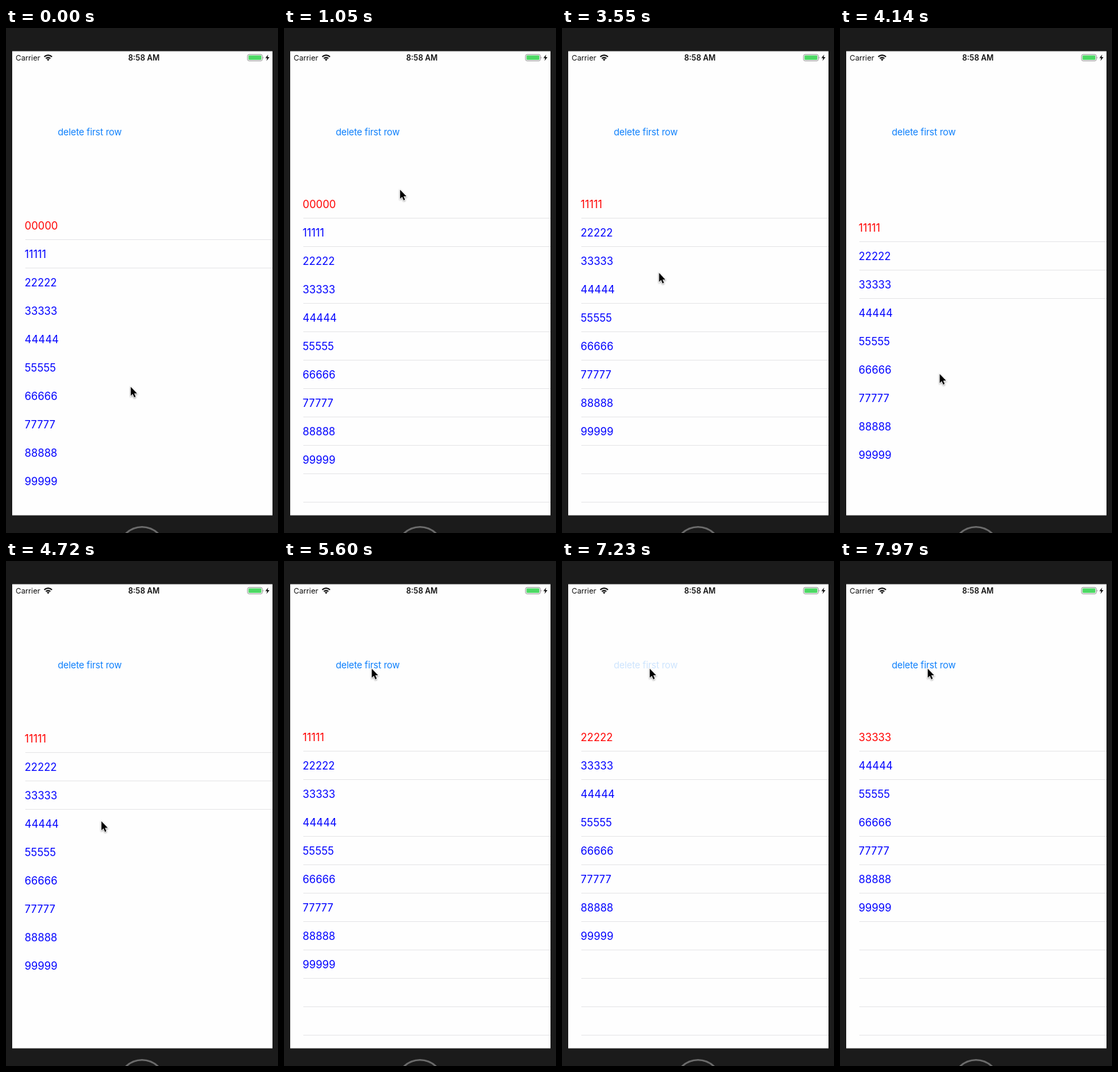
An HTML page for the animation above (8000 ms loop, 394 px wide and 729 px high).

```html
<!DOCTYPE html>
<html lang="en">
<head>
<meta charset="utf-8">
<title>Delete first row</title>
<style>
  html, body { margin: 0; width: 100%; height: 100%; overflow: hidden; background: #1b1b1b; }
  svg { display: block; width: 394px; height: 729px; font-family: Inter, Roboto, sans-serif; }
  .status { font-size: 10.9px; fill: #111; }
  .clock { font-size: 11.1px; font-weight: 600; text-anchor: middle; }
  #button { font-size: 13.4px; letter-spacing: -.15px; fill: #0f80fc; }
  #rows, #leaving { font-size: 15.3px; }
  #lines { fill: #e7e7e9; }
  #cursor { filter: drop-shadow(0 1px 1px rgba(0, 0, 0, .4)); }
</style>
</head>
<body>
<svg viewBox="0 0 394 729">
  <defs><clipPath id="gap"><rect id="gapBox" x="9" y="233" width="377" height="0"/></clipPath></defs>
  <rect width="394" height="729" fill="#1b1b1b"/>
  <circle cx="197" cy="753.5" r="33.3" fill="none" stroke="#6c6c6c" stroke-width="2.6"/>
  <rect x="9" y="33.5" width="377" height="670" fill="#fefefe"/>

  <text class="status" x="14" y="47">Carrier</text>
  <g fill="none" stroke="#111" stroke-width="2">
    <path d="M55.4 41.6a7.9 7.9 0 0 1 11.2 0"/>
    <path d="M57.8 44a4.5 4.5 0 0 1 6.4 0"/>
    <path d="M61 47.4l-1.9-1.9a2.7 2.7 0 0 1 3.8 0z" fill="#111" stroke="none"/>
  </g>
  <text class="status clock" x="199.8" y="47">8:58 AM</text>
  <rect x="349.9" y="38.2" width="21.4" height="9.2" rx="2.2" fill="none" stroke="#8c8c8c" stroke-width=".9"/>
  <rect x="351.3" y="39.6" width="18.6" height="6.4" rx="1" fill="#4cd964"/>
  <path d="M372.4 41.2q1.6 1.6 0 3.2z" fill="#8c8c8c"/>
  <path d="M379.6 38.3l-3.8 5.2h2.5l-.9 4 4.2-5.4h-2.6z" fill="#111"/>

  <text id="button" x="75" y="154.9">delete first row</text>
  <g id="lines"></g>
  <g id="rows"></g>
  <g clip-path="url(#gap)"><text id="leaving" x="27" y="260" fill="#f00"></text></g>
  <rect id="edge" x="9" width="377" height="1.6" fill="#dadada"/>
  <path id="cursor" d="M0 0V13L2.9 10.3 5.1 15.2 7.1 14.3 5 9.6H9.1Z" stroke="#fff" stroke-width="1.4" paint-order="stroke"/>
</svg>
<script>
const LOOP = 8000, BEAT = 147.3, PITCH = 41;
const $ = id => document.getElementById(id);
const clamp = t => Math.min(1, Math.max(0, t));
const ease = t => (t = clamp(t)) * t * (3 - 2 * t);

// All times below are in beats
const presses = [15, 39, 49];
const drags = [{ release: 0, reach: 31 }, { release: 28, reach: 34 }];
const start = { x: 180.7, y: 518 };
const moves = [
  { from: 1, to: 7, x: 168.2, y: 233.5 },
  { from: 7, to: 9, x: 148.2, y: 186 },
  { from: 11, to: 14, x: 135.2, y: 149.5 },
  { from: 19, to: 28, x: 144.5, y: 499.5 },
  { from: 29, to: 36.4, x: 127.2, y: 155.5 }
];

// The list stretches under the finger, then springs back without overshoot
function pull(beat) {
  return drags.reduce((sum, { release, reach }) => {
    const d = beat - release;
    const amount = d < 0 ? clamp(1 + d / 4) : (1 + 1.2 * d) * Math.exp(-1.2 * d);
    return sum + Math.round(reach * amount);
  }, 0);
}

function pointer(beat) {
  return moves.reduce((p, { from, to, x, y }) => {
    const t = ease((beat - from) / (to - from));
    return { x: p.x + (x - p.x) * t, y: p.y + (y - p.y) * t };
  }, start);
}

function set(el, attrs) {
  for (const name in attrs) el.setAttribute(name, attrs[name]);
}

function add(parent, tag, attrs) {
  const el = document.createElementNS("http://www.w3.org/2000/svg", tag);
  set(el, attrs);
  return $(parent).appendChild(el);
}

const label = i => String(i).repeat(5);
const rows = Array.from({ length: 10 }, (_, i) => {
  const el = add("rows", "text", { x: 27 });
  el.textContent = label(i);
  return el;
});
const lines = Array.from({ length: 11 }, () => add("lines", "rect", { x: 28, width: 358, height: 1 }));

function draw(beat) {
  const removed = presses.filter(p => p < beat).length;
  const since = removed ? beat - presses[removed - 1] : Infinity;
  const rest = Math.round(PITCH * (1 - ease((since - .5) / 2.08)));
  const offset = pull(beat);
  const shift = offset + rest;

  // The new first row cross-fades from blue to red once the slide is over
  const red = 255 * clamp((since - 3) / 2);
  rows.forEach((el, i) => set(el, {
    y: 260 + PITCH * (i - removed) + shift,
    fill: i === removed ? `rgb(${red} 0 ${255 - red})` : "#00f",
    display: i < removed ? "none" : "inline"
  }));

  // Hairlines mostly drop out while the list moves; the third never shows at rest
  const shown = rest ? 1 : offset ? removed + 2 : lines.length;
  lines.forEach((el, i) => set(el, {
    y: 274 + PITCH * i + shift,
    opacity: i < shown && (shift || i !== 2) ? 1 : 0
  }));

  $("leaving").textContent = rest ? label(removed - 1) : "";
  set($("leaving"), { opacity: rest / PITCH });
  set($("gapBox"), { height: rest });
  set($("edge"), { y: 232 + rest, opacity: rest ? 1 : 0 });
  set($("button"), { opacity: presses.includes(beat) ? .2 : clamp(.2 + .27 * since) });

  const { x, y } = pointer(beat);
  set($("cursor"), { transform: `translate(${x} ${y})` });
}

function tick(now) {
  draw(Math.floor(now % LOOP / BEAT));
  requestAnimationFrame(tick);
}
draw(0);
requestAnimationFrame(tick);
</script>
</body>
</html>
```
